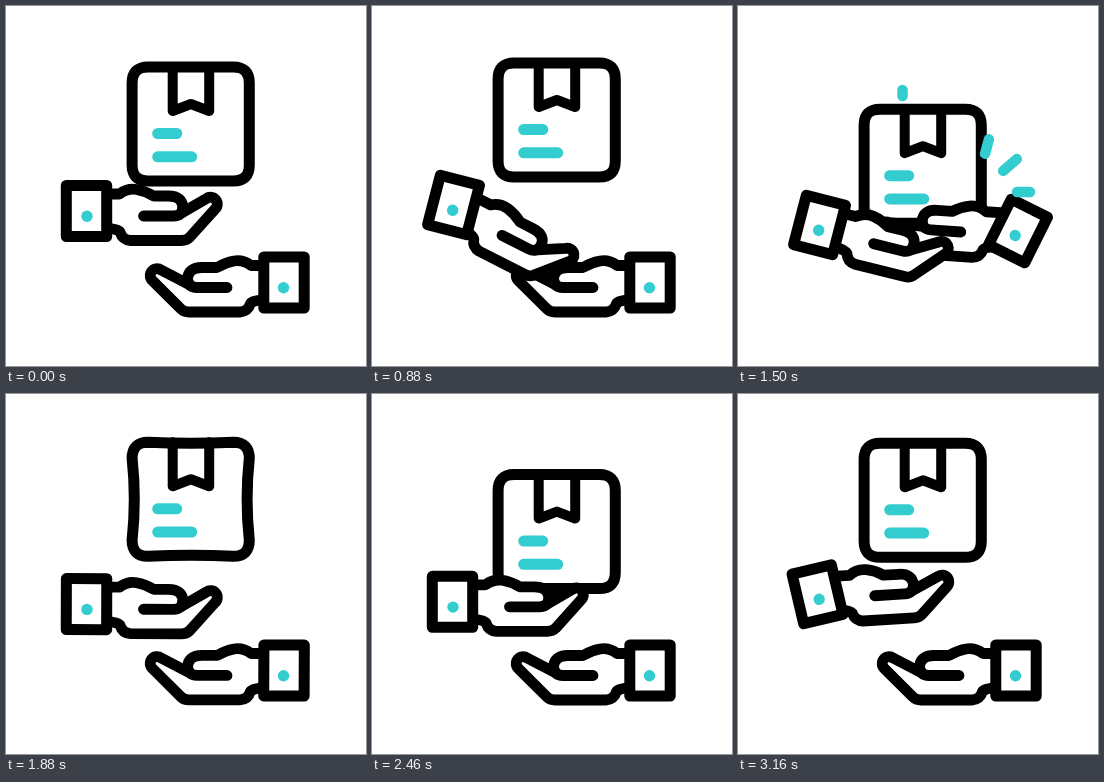
These frames come from a looping animation (360 by 360 pixels, 3.18 s). An HTML page with a canvas:

```html
<!DOCTYPE html>
<html lang="en">
<head>
<meta charset="utf-8">
<title>Parcel handover</title>
<style>
  html, body { margin: 0; width: 100%; height: 100%; overflow: hidden; background: #fff; }
  canvas { display: block; width: 360px; height: 360px; }
</style>
</head>
<body>
<canvas id="stage" width="360" height="360"></canvas>
<script>
const ctx = document.getElementById('stage').getContext('2d');
const TEAL = '#33cccf';
const LOOP = 3180, HOLD = 200, CYCLE = LOOP - HOLD;
const REST_TIME = 2760, REST_TOP = 61;
const HIGH = 31, HELD = 81, LOW = 108;

const rad = deg => deg * Math.PI / 180;
const mix = (a, b, u) => a + (b - a) * u;
const ease = u => (1 - Math.cos(Math.PI * Math.min(1, Math.max(0, u)))) / 2;

// Eases from 0 to 1 over a..b, stays, and eases back over c..d
const pulse = (t, a, b, c, d) => ease((t - a) / (b - a)) - ease((t - c) / (d - c));

// The first throw runs across the loop seam
const unwrap = time => time < 1400 ? time + CYCLE : time;

function boxTop(time) {
  const thrown = pulse(unwrap(time), 2380, 3710, 3710, 4090) + pulse(time, 1450, 1760, 1760, 2060);
  const base = time > 730 && time < 1760 ? LOW : HELD;
  return mix(base, HIGH, thrown);
}

const boxBow = time =>
  2.2 * (pulse(unwrap(time), 3300, 3540, 3560, 3840) + pulse(time, 1600, 1860, 1900, 2060));

// A hand tilts first, then rises and flattens its fingers
const raise = (lift, height, palm, bend) =>
  ({ dx: -2 * lift, dy: -height * lift ** 3, cuff: -26.5 * lift, palm: palm * lift, bend: bend * lift ** 3 });

function leftPose(time) {
  const pose = raise(pulse(unwrap(time), 2760, 3560, 3620, 3860), 38, -7, 19);
  const reach = pulse(time, 640, 880, 1600, 1900);
  const settle = pulse(time, 880, 1110, 1600, 1900);
  const sag = pulse(time, 1600, 1900, 2200, 2760);
  pose.dx += reach;
  pose.dy += 20 * settle - 6 * reach + 5 * sag;
  pose.cuff += 14.5 * reach;
  pose.palm += 27 * reach - 13 * settle;
  return pose;
}

const rightPose = time => raise(pulse(time, 900, 1420, 1560, 1900), 51.5, -4, 14);

function pen(color, width) {
  ctx.strokeStyle = color;
  ctx.lineWidth = width;
}

function line(...points) {
  ctx.beginPath();
  for (let i = 0; i < points.length; i += 2) ctx.lineTo(points[i], points[i + 1]);
  ctx.stroke();
}

function fillStroke() {
  ctx.fillStyle = '#fff';
  ctx.fill();
  ctx.stroke();
}

function drawBox(top, bow) {
  const half = 58.6, r = 16;
  ctx.save();
  ctx.translate(184.7, top + 57);
  pen('#000', 11);
  ctx.beginPath();
  ctx.moveTo(r - half, -half + 1.6);
  for (let i = 0; i < 4; i++) {
    const edge = i % 2 ? half : half - 1.6, next = i % 2 ? half - 1.6 : half;
    const sag = bow * (i % 2 ? 2 : 1);
    const [c, s] = [Math.cos(i * Math.PI / 2), Math.sin(i * Math.PI / 2)];
    const at = (x, y) => [x * c - y * s, x * s + y * c];
    ctx.quadraticCurveTo(...at(0, sag - edge), ...at(next - r, -edge));
    ctx.quadraticCurveTo(...at(next, -edge), ...at(next, r - edge));
  }
  ctx.closePath();
  fillStroke();
  pen('#000', 10);
  line(-18, -57, -18, -13, 0.2, -20, 18.5, -13, 18.5, -57);
  pen(TEAL, 11);
  line(-33, 9.5, -14, 9.5);
  line(-33, 32.8, 1, 32.8);
  ctx.restore();
}

// Palm-up hand; the origin is the centre of the cuff
function drawHand({ dx, dy, cuff, palm, bend }, x, y, flip, reach) {
  const c = Math.cos(rad(bend)), s = Math.sin(rad(bend));
  const bent = (px, py) => [70 + px * c - py * s + reach, 20 + px * s + py * c];
  ctx.save();
  ctx.translate(x, y);
  ctx.scale(flip, 1);
  ctx.translate(dx, dy);

  ctx.save();
  ctx.rotate(rad(palm));
  pen('#000', 10.8);
  ctx.beginPath();
  ctx.moveTo(12, -17);
  ctx.lineTo(33, -17);
  ctx.quadraticCurveTo(41, -23, 50, -21.5);
  ctx.quadraticCurveTo(59, -20, 67, -15);
  ctx.lineTo(82, -15);
  ctx.quadraticCurveTo(96, -15, 96.5, -3);
  ctx.lineTo(95, 2);
  ctx.arc(...bent(54, -27), 6.8, rad(bend - 127), rad(bend + 48));
  ctx.lineTo(103, 26.5);
  ctx.quadraticCurveTo(100, 29.5, 95, 29.5);
  ctx.lineTo(44, 29.5);
  ctx.quadraticCurveTo(36, 29, 33.5, 21);
  ctx.quadraticCurveTo(31, 17, 12, 17);
  fillStroke();
  ctx.beginPath();
  ctx.moveTo(96.5, -4);
  ctx.quadraticCurveTo(96, 5, 87, 5);
  ctx.lineTo(57, 5);
  ctx.stroke();
  ctx.restore();

  ctx.rotate(rad(cuff));
  pen('#000', 11);
  ctx.beginPath();
  ctx.rect(-20.2, -25.5, 40.4, 51);
  fillStroke();
  ctx.beginPath();
  ctx.arc(0.5, 5.3, 5.7, 0, 7);
  ctx.fillStyle = TEAL;
  ctx.fill();
  ctx.restore();
}

function drawSparks(time) {
  const s = (time - 1380) / 240;
  if (s <= 0 || s >= 1) return;
  pen(TEAL, 10.5);
  const spark = (x, y, deg, length) => {
    const ux = Math.cos(rad(deg)), uy = Math.sin(rad(deg));
    const mid = (s - 0.5) * 32, half = length / 2 * Math.sin(Math.PI * s);
    line(x + ux * (mid - half), y + uy * (mid - half), x + ux * (mid + half), y + uy * (mid + half));
  };
  spark(164.5, 87, -90, 6);
  spark(249, 140.5, -75, 15);
  spark(272, 159, -41, 18);
  spark(285.5, 186, 0, 13);
}

function draw(time) {
  const still = time < HOLD, t = still ? REST_TIME : time;
  ctx.fillStyle = '#fff';
  ctx.fillRect(0, 0, 360, 360);
  ctx.lineCap = ctx.lineJoin = 'round';
  drawBox(still ? REST_TOP : boxTop(t), boxBow(t));
  drawHand(rightPose(t), 278, 276.5, -1, 3);
  drawHand(leftPose(t), 80.5, 205, 1, 0);
  drawSparks(t);
}

const start = performance.now();
function tick() {
  const time = (performance.now() - start) % LOOP;
  draw(Math.floor(time / 20) * 20);
  requestAnimationFrame(tick);
}
tick();
</script>
</body>
</html>
```
